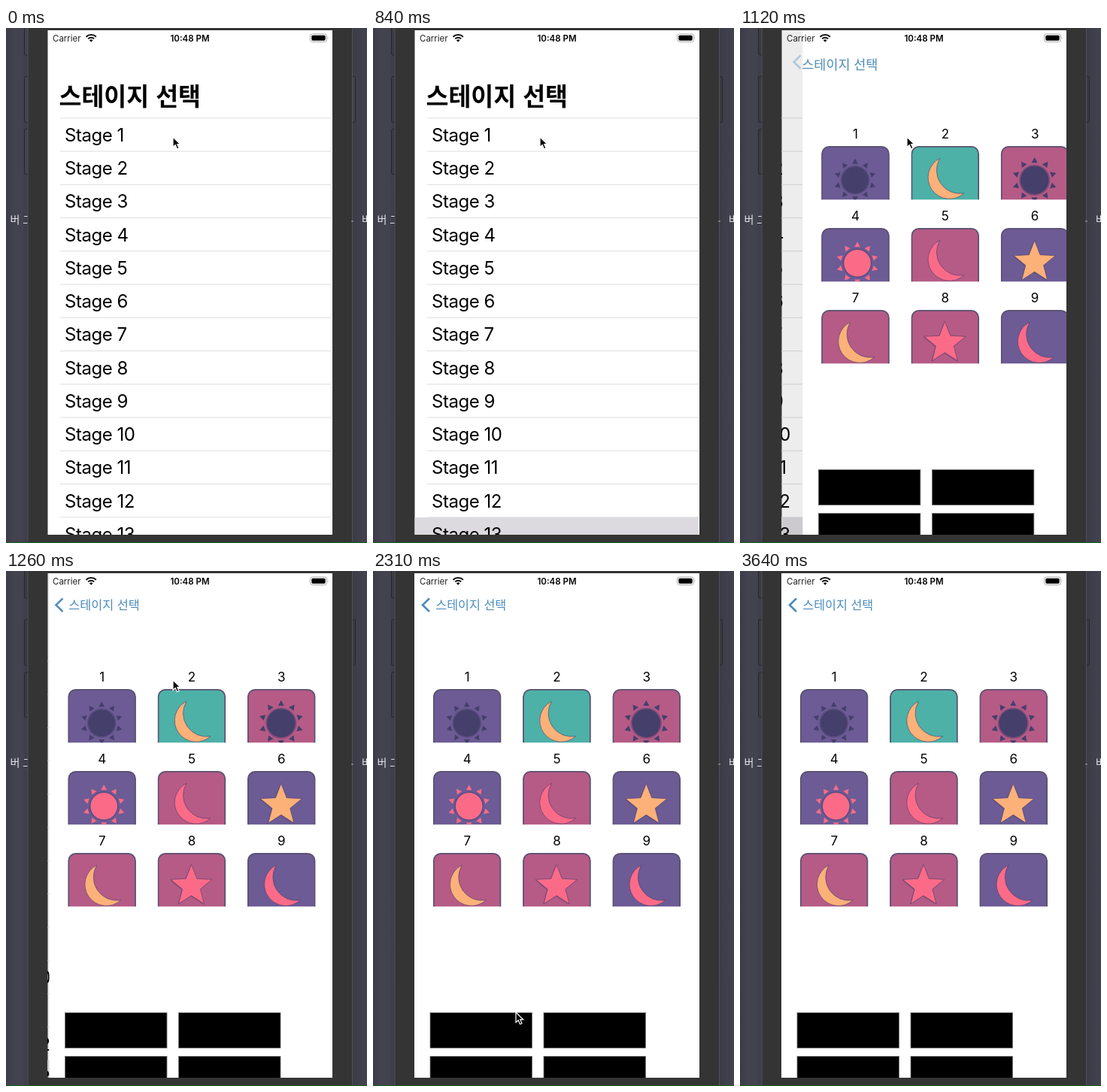
Write an HTML page that moves like this. It is 480 px wide and 685 px high and loops after 3.71 s.

```html
<!DOCTYPE html>
<html lang="ko">
<head>
<meta charset="utf-8">
<title>Stage picker</title>
<style>
  @property --p { syntax: "<number>"; inherits: true; initial-value: 0; }
  html, body { margin: 0; width: 100%; height: 100%; overflow: hidden; background: #343434; }
  svg {
    display: block;
    font-family: Inter, "Noto Sans CJK KR", "Noto Sans CJK", sans-serif;
    animation: push 3710ms step-end infinite;
  }
  .ko { font-family: "Noto Sans CJK KR", "Noto Sans CJK", sans-serif; }
  .row { font-size: 24px; letter-spacing: -.02em; }
  .num { font-size: 17px; text-anchor: middle; }

  /* --p: progress of the push transition */
  @keyframes push {
    0%, 22.64% { --p: 0; }
    24.52% { --p: .286; }
    26.41% { --p: .628; }
    28.30% { --p: .825; }
    30.18% { --p: .925; }
    32.07% { --p: .974; }
    33.96% { --p: .9934; }
    35.84% { --p: .9985; }
    37.73%, 100% { --p: 1; }
  }
  #list { transform: translateX(calc(var(--p) * -113px)); }
  #dim { opacity: calc(var(--p) * .075); }
  #detail { transform: translateX(calc((1 - var(--p)) * 378px)); }
  #title { transform: translate(calc(72px + var(--p) * 12px), calc(91px - var(--p) * 46px)); }
  #big { transform: scale(calc(1 - var(--p) * .5)); opacity: calc(1 - var(--p)); }
  #small { transform: scale(calc(2 - var(--p))); opacity: var(--p); }
  #chevron {
    transform: translateX(calc((1 - var(--p)) * 75px));
    opacity: calc((var(--p) - .88) * 8.4);
  }

  #pressed { animation: press 3710ms step-end infinite; }
  @keyframes press { 0% { opacity: 0; } 20.75%, 100% { opacity: 1; } }
  .key { animation: shade 3710ms step-end infinite; }
  @keyframes shade { 0% { fill: #42424f; } 18.86%, 100% { fill: #3a3a41; } }

  #cursor { animation: point 3710ms linear infinite; }
  @keyframes point {
    0%, 47.16% { transform: translate(222px, 145px); animation-timing-function: ease-in-out; }
    62%, 62.8% { transform: translate(190px, 587px); }
    77.35% { transform: translate(196px, 641px); }
    94.3%, 99.99% { transform: translate(204px, 690px); }
    100% { transform: translate(222px, 145px); }
  }
</style>
</head>
<body>
<svg width="480" height="685" viewBox="0 0 480 685">
  <defs>
    <linearGradient id="desk">
      <stop offset="0" stop-color="#3c3c48"/>
      <stop offset=".02" stop-color="#434350"/>
      <stop offset=".045" stop-color="#434350"/>
      <stop offset=".06" stop-color="#3c3c48"/>
      <stop offset=".96" stop-color="#3c3c48"/>
      <stop offset="1" stop-color="#434350"/>
    </linearGradient>
    <clipPath id="screen"><rect x="55.5" y="3" width="378.5" height="671"/></clipPath>
    <clipPath id="face"><rect width="91" height="71.5"/></clipPath>
  </defs>

  <rect width="480" height="685" fill="url(#desk)"/>
  <g class="ko" font-size="14" fill="#e6e6ea">
    <text x="5.500" y="260">버 그</text>
    <text x="473" y="260">버</text>
  </g>
  <g stroke="#25252b">
    <rect class="key" x="24.500" y="-4" width="12" height="40" rx="2"/>
    <rect class="key" x="24.500" y="64.500" width="12" height="61" rx="2"/>
    <rect class="key" x="24.500" y="134.500" width="12" height="60" rx="2"/>
    <rect class="key" x="452" y="64.500" width="12.500" height="61" rx="2"/>
  </g>
  <rect x="29" width="431.500" height="685" fill="#343434"/>
  <path d="M29 0V685M460.500 0V685" stroke="#50505a"/>
  <path d="M459 257h3" stroke="#aaa"/>

  <g clip-path="url(#screen)">
    <rect x="55" y="3" width="379" height="671" fill="#fff"/>
    <g id="list"><rect id="pressed" x="55" y="651" width="379" height="24" fill="#dcdade"/></g>
    <rect id="dim" x="55" y="3" width="379" height="671"/>
    <g id="detail"><rect x="55" y="3" width="379" height="671" fill="#fff"/></g>

    <g id="title" class="ko">
      <text id="big" x="-1.500" y="12.300" font-size="32.500" font-weight="700">스테이지 선택</text>
      <text id="small" x="-.700" y="6" font-size="16.200" fill="#4b8bbd">스테이지 선택</text>
    </g>
    <path id="chevron" d="M75 36.500L66 45.300L75 54" fill="none" stroke="#4b8bbd" stroke-width="2.600"/>

    <text x="62" y="17.500" font-size="11.500" fill="#222">Carrier</text>
    <g fill="none" stroke="#111" stroke-width="2">
      <path d="M106.500 11.800a9.500 9.500 0 0 1 13.400 0M109.200 14.400a5.700 5.700 0 0 1 8 0"/>
    </g>
    <path d="M113.200 18.800l-2.300-2.600a3.400 3.400 0 0 1 4.600 0z" fill="#111"/>
    <text x="244.500" y="17.500" font-size="11.500" font-weight="600" text-anchor="middle">10:48 PM</text>
    <rect x="404.500" y="8" width="22" height="10.500" rx="3" fill="none" stroke="#aaa"/>
    <rect x="406.300" y="9.700" width="18.400" height="7" rx="1.600"/>
    <path d="M427.800 11.500q1.600 1.700 0 3.600z" fill="#aaa"/>
  </g>

  <path d="M0 684.500H480" stroke="#17621c"/>
  <path id="cursor" d="M0 0V13.500L3.200 10.600L5.500 15.800L8 14.700L5.700 9.700H9.800Z" stroke="#fff" stroke-width="1.200"/>
</svg>

<script>
  const list = document.getElementById('list');
  const detail = document.getElementById('detail');
  const add = (parent, markup) => parent.insertAdjacentHTML('beforeend', markup);

  for (let i = 0; i < 13; i++) {
    const y = 119.8 + i * 44.25;
    add(list, `<path d="M72 ${y}H434" stroke="#dedede"/>
      <text class="row" x="78" y="${y + 31}">Stage ${i + 1}</text>`);
  }

  const purple = '#6c5b95', plum = '#b55b86', teal = '#4db1a8';
  const navy = '#453f6b', pink = '#fb6b88', peach = '#fcb179';
  const edge = 'stroke="#4a3d6b" stroke-opacity=".6"';

  // Point at a clockwise angle from straight up
  const polar = (r, deg) => {
    const a = deg * Math.PI / 180;
    return `${(r * Math.sin(a)).toFixed(2)} ${(-r * Math.cos(a)).toFixed(2)}`;
  };

  function sun(color, x, y, k) {
    let rays = '';
    for (let a = 0; a < 360; a += 36) {
      rays += `M${polar(28.5, a)}L${polar(22, a + 10)}L${polar(22, a - 10)}Z`;
    }
    return `<g transform="translate(${x} ${y}) scale(${k})" fill="${color}">
      <circle r="19.500" fill="#4a3d6b" opacity=".45"/>
      <circle r="17.800"/><path d="${rays}"/></g>`;
  }

  function star(color, x, y) {
    let points = [];
    for (let i = 0; i < 10; i++) points.push(polar(i % 2 ? 12.5 : 29, i * 36));
    const d = `M${points.join('L')}Z`;
    return `<g transform="translate(${x} ${y})"><path d="${d}" transform="translate(-1 1)" fill="#4a3d6b" opacity=".4"/>
      <path d="${d}" fill="${color}" ${edge}/></g>`;
  }

  const moon = color =>
    `<path d="M38.500 16.500A28.500 28.500 0 1 0 70.500 63A31 31 0 0 1 38.500 16.500Z" fill="${color}" ${edge}/>`;

  const cards = [
    [purple, sun(navy, 45, 45.5, 1)],
    [teal, moon(peach)],
    [plum, sun(navy, 45, 45.5, 1.06)],
    [purple, sun(pink, 48, 47, 1)],
    [plum, moon(pink)],
    [purple, star(peach, 45, 46)],
    [plum, moon(peach)],
    [plum, star(pink, 45, 44.5)],
    [purple, moon(pink)]
  ];
  cards.forEach(([fill, shape], i) => {
    const x = 79.7 + i % 3 * 119.3, y = 156.8 + Math.floor(i / 3) * 109;
    add(detail, `<g transform="translate(${x} ${y})">
      <text class="num" x="45.500" y="-10">${i + 1}</text>
      <g clip-path="url(#face)">
        <rect x="1" y="1" width="88.800" height="100" rx="9.500" fill="${fill}" stroke="#59526f" stroke-width="1.800"/>
        ${shape}
      </g></g>`);
  });

  for (const y of [587.5, 645.5]) {
    for (const x of [76, 227]) {
      add(detail, `<rect x="${x}" y="${y}" width="135.500" height="47" stroke="#777" stroke-width=".8"/>`);
    }
  }
</script>
</body>
</html>
```
